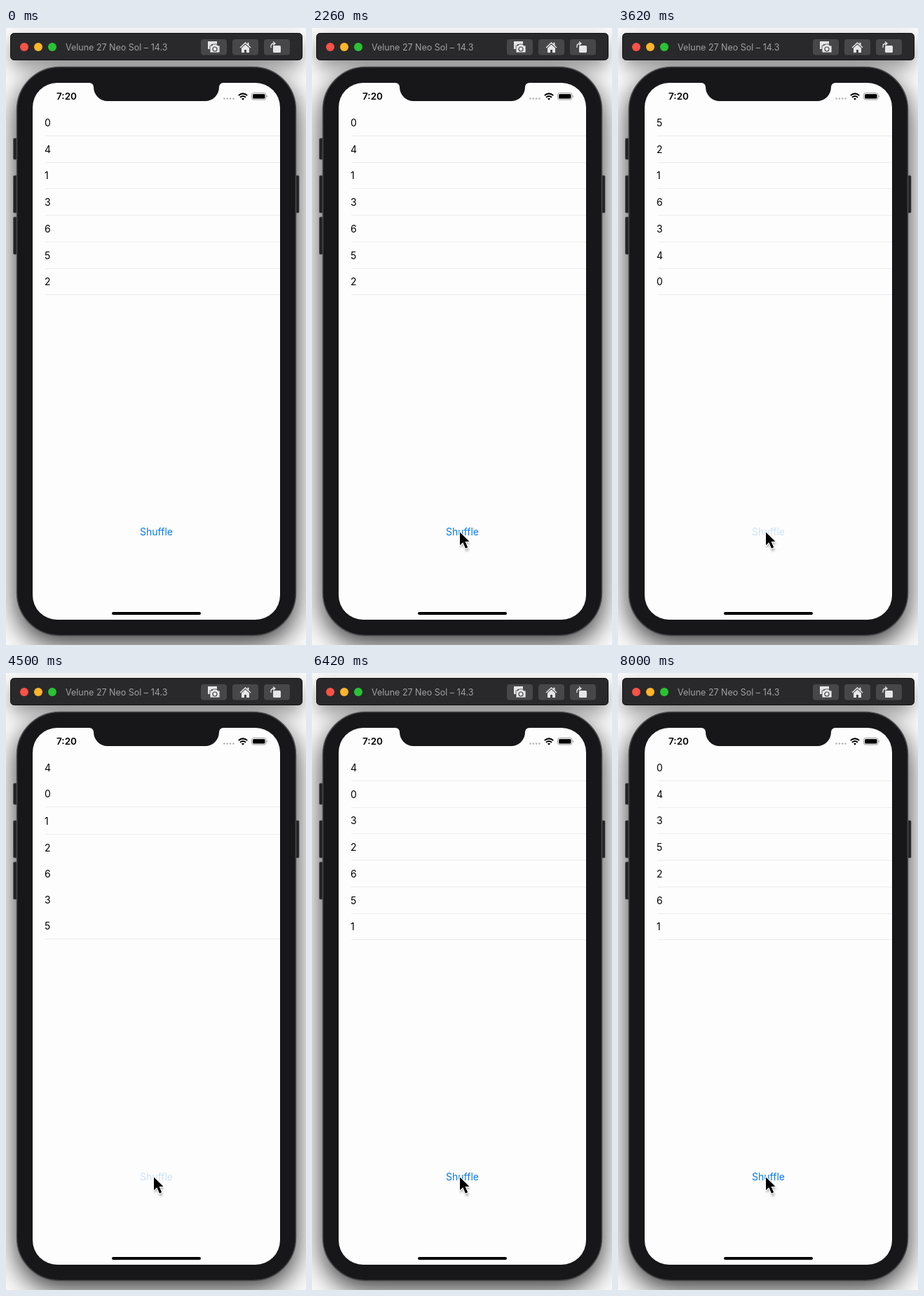
An HTML page for the animation above (8.02 s loop, 428 px wide and 878 px high).

```html
<!DOCTYPE html>
<html lang="en">
<head>
<meta charset="utf-8">
<title>Shuffle list</title>
<style>
  html, body { margin: 0; width: 100%; height: 100%; overflow: hidden; background: #fafafa; }
  svg { display: block; width: 428px; height: 878px; font: 14px Inter, Roboto, sans-serif; }
</style>
</head>
<body>
<svg viewBox="0 0 428 878">
  <defs>
    <filter id="soft" x="-30%" y="-30%" width="160%" height="160%"><feGaussianBlur stdDeviation="18"/></filter>
    <filter id="softBar" x="-30%" y="-200%" width="160%" height="500%"><feGaussianBlur stdDeviation="13"/></filter>
    <filter id="glow" x="-50%" y="-50%" width="200%" height="200%"><feGaussianBlur stdDeviation="1.6"/></filter>
  </defs>

  <!-- window shadows -->
  <rect width="428" height="878" fill="#fafafa"/>
  <rect x="7" y="18" width="414" height="38" rx="6" opacity=".4" filter="url(#softBar)"/>
  <rect x="14" y="68" width="401" height="810" rx="62" opacity=".75" filter="url(#soft)"/>

  <!-- toolbar -->
  <rect x="6.5" y="7.5" width="416" height="38" rx="5" fill="#29292b" stroke="#111112"/>
  <circle cx="26" cy="27" r="6" fill="#fb5146"/>
  <circle cx="46" cy="27" r="6" fill="#fdb529"/>
  <circle cx="66" cy="27" r="6" fill="#27c434"/>
  <text x="85" y="32" font-size="12.5" fill="#a0a0a0">Velune 27 Neo Sol – 14.3</text>
  <g fill="#474749">
    <rect x="278" y="16" width="37" height="22.5" rx="4"/>
    <rect x="323" y="16" width="37" height="22.5" rx="4"/>
    <rect x="368" y="16" width="37" height="22.5" rx="4"/>
  </g>
  <g fill="#e6e6e6">
    <path d="M288 19h13v4h-8v7h-5z"/>
    <path d="M291 25h3l1.5-2h5l1.5 2h3v10h-14z" stroke="#474749" stroke-width=".8"/>
    <circle cx="298" cy="30" r="3" fill="none" stroke="#474749" stroke-width="1.2"/>
    <path d="M333.500 27.500l8-7.500 3 2.800v-2h2v4l3 2.700-1 1-7-6.500-7 6.500z"/>
    <path d="M336 28.500l5.500-5 5.500 5v6.500h-4v-4h-3v4h-4z"/>
    <rect x="381" y="25" width="11" height="10" rx="1.5"/>
    <path d="M378 28v-2q0-4 5-4M381 19.500l3 2.500-3 2.500" fill="none" stroke="#e6e6e6" stroke-width="1.3"/>
  </g>

  <!-- phone -->
  <g fill="#232325" stroke="#48484a" stroke-width=".7">
    <rect x="10.5" y="157" width="7" height="30" rx="1.5"/>
    <rect x="10.5" y="210" width="7" height="53" rx="1.5"/>
    <rect x="10.5" y="269" width="7" height="53" rx="1.5"/>
    <rect x="411" y="210" width="7" height="53" rx="1.5"/>
  </g>
  <rect x="15.5" y="55.5" width="398" height="809" rx="61" fill="#171719" stroke="#4a4a4c" stroke-width="1.5"/>
  <rect x="38" y="78" width="353" height="764" rx="35" fill="#fdfdfd"/>

  <g id="list"></g>

  <path d="M119 78a6 6 0 0 1 6 6a20 20 0 0 0 20 20h139a20 20 0 0 0 20-20a6 6 0 0 1 6-6z" fill="#171719"/>
  <text x="72" y="102" font-size="13.5" font-weight="600">7:20</text>
  <g fill="#b4b4b6">
    <circle cx="311.5" cy="100.5" r="1.3"/><circle cx="315.8" cy="100.5" r="1.3"/>
    <circle cx="320.1" cy="100.5" r="1.3"/><circle cx="324.4" cy="100.5" r="1.3"/>
  </g>
  <g fill="none" stroke="#000" stroke-width="2">
    <path d="M331.800 96q6.200-5.200 12.400 0M334 98.700q4-3.400 8 0"/>
    <path d="M336 100.500q2-1.500 4 0l-2 2.200z" fill="#000" stroke="none"/>
  </g>
  <rect x="350.5" y="92.5" width="20.5" height="9.5" rx="2.8" fill="none" stroke="#99999b"/>
  <rect x="352" y="94" width="17.5" height="6.5" rx="1.5"/>
  <path d="M372 95.500q2 1.700 0 3.500z" fill="#99999b"/>
  <text id="button" x="214.5" y="722" text-anchor="middle" fill="#0a7aea">Shuffle</text>
  <rect x="151" y="831" width="127" height="4" rx="2"/>

  <g id="cursor">
    <path d="M0 0v20l4.500-4 4 9 4-2-4-8.500h6z" fill="#777" opacity=".55" filter="url(#glow)" transform="translate(1 3)"/>
    <path d="M.5 .5v18.500l4.300-4 3.700 8.500 3.200-1.400-3.700-8.300h6z" stroke="#fff" stroke-width="2" stroke-linejoin="round" paint-order="stroke"/>
  </g>
</svg>
<script>
const LOOP = 8020, PITCH = 37.75, FIRST_LINE = 153.25, MOVE = 7, PRESS = 1.5;
const START = '0413652';
// Release tick of each click and the order it leads to.
const clicks = [
  [55, '1432056'], [63, '3160425'], [70, '5216340'], [77, '2604153'],
  [84, '0453612'], [90.4, '4012635'], [98, '6315042'], [105, '2450163'],
  [112, '0541362'], [123, '3206415'], [130, '4032651'], [139, '1540326'],
  [146, '6213504'], [153, '2561430'], [161, '0435261']
];
const $ = id => document.getElementById(id);
const clamp = u => Math.max(0, Math.min(1, u));
const ease = u => u * u * (3 - 2 * u);

// The picture advances three ticks every 140 ms, unevenly spaced.
function tickAt(ms) {
  const r = ms % 140;
  return Math.floor(ms / 140) * 3 + (r < 20 ? 0 : r < 120 ? 1 : 2);
}

// Vertical distance a cell still has to travel; overlapping moves add up.
function offsetOf(cell, tick) {
  let sum = 0, before = START;
  for (const [at, after] of clicks) {
    if (tick < at) break;
    const p = ease(clamp((tick - at) / MOVE));
    const row = after.indexOf(cell), shift = before.indexOf(cell) - row;
    const dip = shift || row === 6 ? 0 : (2.25 - row / 4) * p;
    sum += (shift + dip) * (1 - p) * PITCH;
    before = after;
  }
  return sum;
}

const line = (x, y, fill) => `<rect x="${x}" y="${y}" width="${391 - x}" height="1" fill="${fill}"/>`;

function drawCell(cell, row, tick, moving) {
  const off = offsetOf(cell, tick), y = FIRST_LINE + row * PITCH + off;
  const top = Math.floor(y - PITCH) + 1, bottom = Math.floor(y);
  return `<rect x="38" y="${top}" width="353" height="${bottom + 1 - top}" fill="#fdfdfd"/>` +
    line(56, bottom, '#ededef') +
    (moving && row && off > 1.5 ? line(38, top - 2, '#c8c8ca') : '') +
    `<text x="55" y="${y - 13.5}">${cell}</text>`;
}

function drawList(tick) {
  const done = clicks.filter(c => c[0] <= tick).map(c => c[1]);
  const order = done.at(-1) || START, before = done.at(-2) || START;
  $('list').innerHTML = [...order]
    .map((cell, row) => drawCell(cell, row, tick, before[row] !== cell)).join('');
}

function buttonAlpha(tick) {
  if (clicks.some(([at]) => tick >= at - PRESS && tick < at)) return 0.2;
  const last = clicks.filter(([at]) => at <= tick).at(-1);
  return last ? 0.2 + 0.8 * clamp((tick - last[0]) / MOVE) : 1;
}

function drawCursor(tick) {
  const p = ease(clamp((tick - 22) / 18));
  $('cursor').setAttribute('transform', `translate(${-19.5 + 230 * p} ${335 + 382 * p})`);
}

let begin;
function draw(now) {
  begin ??= now;
  const tick = tickAt((now - begin) % LOOP);
  drawList(tick);
  drawCursor(tick);
  $('button').setAttribute('opacity', buttonAlpha(tick));
  requestAnimationFrame(draw);
}
requestAnimationFrame(draw);
</script>
</body>
</html>
```
